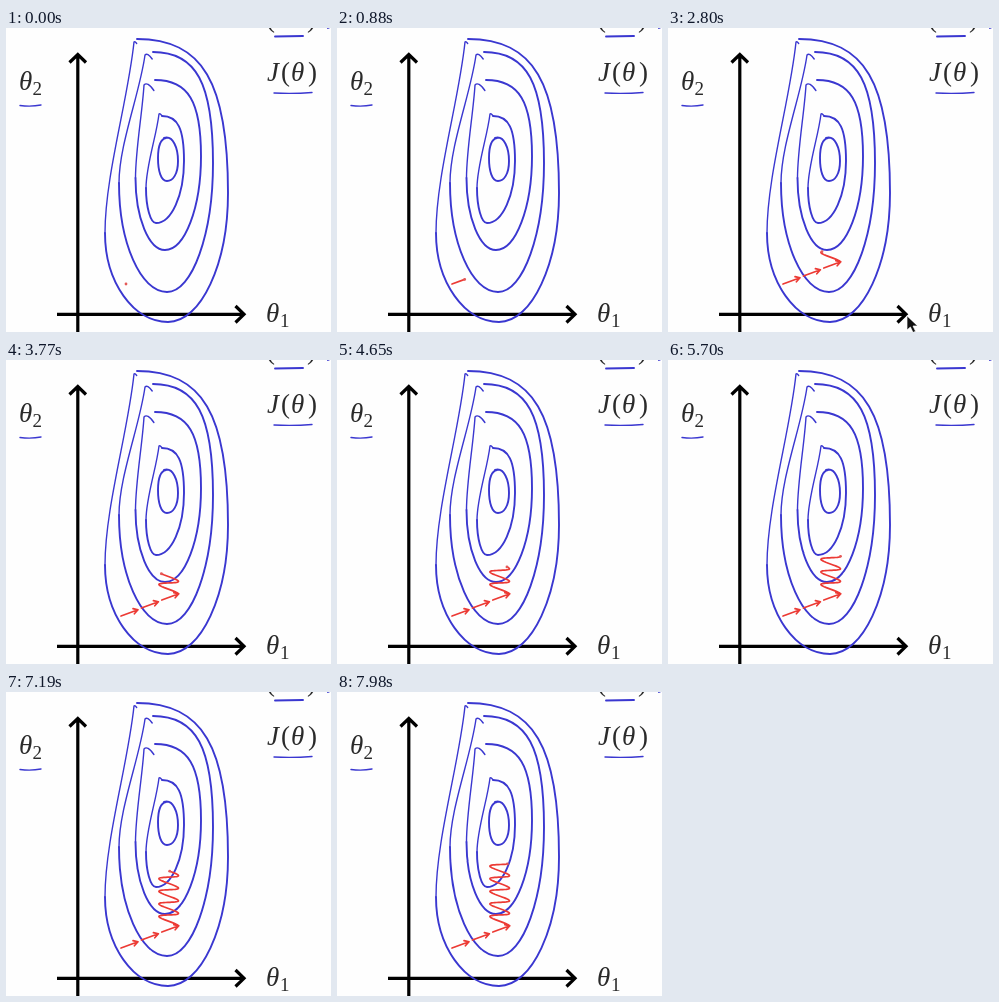
These frames come from a looping animation (325x304 px, 8000 ms). An HTML page:

```html
<!DOCTYPE html>
<html lang="en">
<head>
<meta charset="utf-8">
<title>Gradient descent on contours</title>
<style>
  html, body { margin: 0; width: 100%; height: 100%; overflow: hidden; background: #fefefe; }
  svg { display: block; width: 100vw; height: 100vh; }
  text { font-family: "Liberation Serif", serif; font-size: 27px; fill: #2a2a2a; }
  .i { font-style: italic; }
  .sub { font-size: 19px; }
  path { fill: none; stroke-linecap: round; stroke-linejoin: round; }
  #axes { stroke: #000; stroke-width: 3.2; stroke-linecap: butt; stroke-linejoin: miter; }
  #ink path { stroke: #3a37d0; stroke-width: 1.9; }
  #ink .light { stroke-width: 1.4; }
  #pen { stroke: #ec3a34; stroke-width: 1.7; }
  #cursor { fill: #111; stroke: #fff; stroke-width: .7; }
</style>
</head>
<body>
<svg viewBox="0 0 325 304">
  <path id="axes" d="M71.8 304V27M63.5 34.5L71.8 26.5L80 34.5M51 286.3H238M229.5 278L238 286.3L229.5 294.5"/>
  <text x="13" y="62" class="i">θ</text><text x="26.5" y="67" class="sub">2</text>
  <text x="260" y="294" class="i">θ</text><text x="274" y="299" class="sub">1</text>
  <text y="53"><tspan x="261" class="i">J</tspan><tspan x="275">(</tspan><tspan x="285" class="i">θ</tspan><tspan x="302">)</tspan></text>
  <text y="-1"><tspan x="260">(</tspan><tspan x="301">)</tspan></text>
  <g id="ink">
    <path class="light" d="M14 77.5Q25 79 35 77"/>
    <path class="light" d="M268 65Q287 66 306 64.5"/>
    <path d="M269 8.5L297 8M322 0L324 -1"/>
  </g>
  <path id="pen"/>
  <circle id="tip" r="1.4" fill="#e45a58"/>
  <path id="cursor" d="M239 288V302L242.4 299L245 304.5L247.6 303.3L245 298H249.5Z"/>
</svg>
<script>
const LOOP = 8000;
const $ = id => document.getElementById(id);
const clamp01 = v => Math.max(0, Math.min(1, v));

function addInk(d, className = "") {
  const path = document.createElementNS("http://www.w3.org/2000/svg", "path");
  path.setAttribute("d", d);
  path.setAttribute("class", className);
  $("ink").append(path);
}

// An open egg: from its start over the right and bottom, then a lighter rise on the left to a hook.
function contour([sx, sy], [rx, ry], [bx, by], [lx, ly], [ex, ey]) {
  const mix = (a, b, k) => a + (b - a) * k;
  addInk(`M${sx} ${sy}
    C${mix(sx, rx, .72)} ${sy} ${rx} ${mix(ry, sy, .72)} ${rx} ${ry}
    C${rx} ${mix(ry, by, .55)} ${mix(bx, rx, .55)} ${by} ${bx} ${by}
    C${mix(bx, lx, .55)} ${by} ${lx} ${mix(ly, by, .55)} ${lx} ${ly}`);
  const gap = sx - ex;
  addInk(`M${lx} ${ly}
    C${lx} ${mix(ly, ey, .3)} ${mix(ex, lx, .2)} ${mix(ey, ly, .3)} ${ex} ${ey}
    q${gap * .3} ${-gap * .35} ${gap * .9} ${gap * .5}`, "light");
}
// Start, right, bottom, left and hook of each.
contour([131, 11], [222, 165], [162, 294], [99, 205], [128, 14]);
contour([147, 24], [207, 135], [161, 264], [113, 155], [139, 27]);
contour([149, 52], [195, 128], [159, 222], [129.5, 150], [138, 57]);
contour([156, 88], [178, 133], [150, 195], [140, 160], [153, 86]);
addInk("M158 110C167 107 172 120 172 133S167 153 161 153S152 143 152 130S155 111 160 110");

const arrowTimes = [620, 1060, 1760];
const SHAFT = 350, HEAD = 150;
const zigzagStart = arrowTimes[2] + SHAFT;

// Rightmost at the start; swings once per 1200 ms while climbing, higher on the left.
function zigzag(time) {
  const age = time - zigzagStart;
  const swing = Math.cos(age / 1200 * 2 * Math.PI);
  return [162.7 + 9.8 * swing, 232.4 - .0105 * age + 1.6 * swing];
}

function draw(now) {
  const t = now % LOOP;
  let d = "", tip = [120 - 4 * clamp01((t - 90) / 360), 256];

  arrowTimes.forEach((begin, i) => {
    if (t < begin) return;
    const x = 115 + 20.4 * i, y = 256 - 8 * i;
    const grow = clamp01((t - begin) / SHAFT);
    tip = [x + 17 * grow, y - 6.2 * grow];
    d += `M${x} ${y}L${tip}`;
    if (t > begin + SHAFT) {
      const barb = clamp01((t - begin - SHAFT) / HEAD);
      d += `m${-5 * barb} ${-1.2 * barb}L${tip}l${-3.6 * barb} ${4 * barb}`;
    }
  });

  if (t > zigzagStart) {
    d += "M" + zigzag(zigzagStart);
    for (let s = zigzagStart; s < t; s += 40) d += "L" + zigzag(s);
    tip = zigzag(t);
    d += "L" + tip;
  }

  $("pen").setAttribute("d", d);
  $("tip").setAttribute("cx", tip[0]);
  $("tip").setAttribute("cy", tip[1]);
  $("cursor").style.display = t >= 2620 && t < 3070 ? "" : "none";
  requestAnimationFrame(() => draw(performance.now() - start));
}
const start = performance.now();
draw(0);
</script>
</body>
</html>
```
